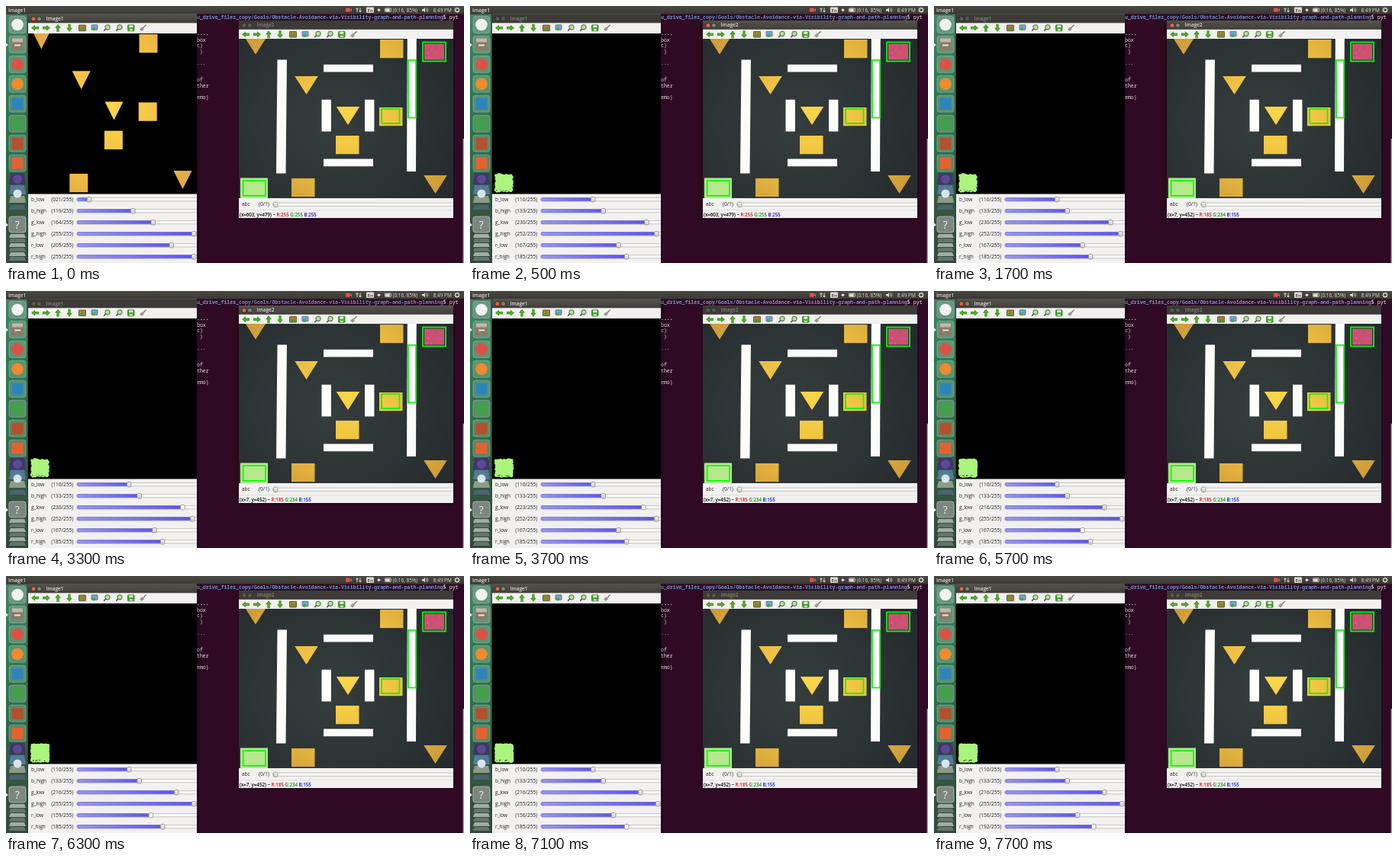
These frames come from a looping animation (600 px wide and 337 px high, 8000 ms). An HTML page with a canvas:

```html
<!DOCTYPE html>
<html lang="en">
<head>
<meta charset="utf-8">
<title>Colour threshold sliders</title>
<style>
html, body { margin: 0; width: 100%; height: 100%; overflow: hidden; background: #300a24; }
canvas { display: block; width: 100vw; height: 100vh; }
</style>
</head>
<body>
<canvas id="stage" width="600" height="337"></canvas>
<script>
const c = document.getElementById('stage').getContext('2d');
const LOOP = 8000, STEP = 200;
const SANS = '"Open Sans", sans-serif';
const MONO = '"Noto Sans Mono", monospace';
const INK = '#222', LIGHT = '#dfdbd2', GREEN = '#10f510', PANEL = '#f2f1f0';

const clamp = p => Math.min(1, Math.max(0, p));
const mix = (a, b, p) => Math.round(a + (b - a) * p);

function rect(x, y, w, h, fill) {
  c.fillStyle = fill;
  c.fillRect(x, y, w, h);
}
function outline(x, y, w, h, color, width = 1.8) {
  c.strokeStyle = color;
  c.lineWidth = width;
  c.strokeRect(x, y, w, h);
}
function poly(fill, ...points) {
  c.beginPath();
  points.forEach(p => c.lineTo(...p));
  c.fillStyle = fill;
  c.fill();
}
function line(color, width, ...points) {
  c.beginPath();
  points.forEach(p => c.lineTo(...p));
  c.strokeStyle = color;
  c.lineWidth = width;
  c.stroke();
}
function disc(x, y, r, fill) {
  c.beginPath();
  c.arc(x, y, r, 0, 7);
  c.fillStyle = fill;
  c.fill();
}
function round(x, y, w, h, r, fill, edge) {
  c.beginPath();
  c.roundRect(x, y, w, h, r);
  c.fillStyle = fill;
  c.fill();
  if (!edge) return;
  c.strokeStyle = edge;
  c.lineWidth = 0.8;
  c.stroke();
}
function stops(gradient, colors) {
  colors.forEach((col, i) => gradient.addColorStop(i / (colors.length - 1), col));
  return gradient;
}
const fadeDown = (y0, y1, ...colors) => stops(c.createLinearGradient(0, y0, 0, y1), colors);
const fadeRight = (x0, x1, ...colors) => stops(c.createLinearGradient(x0, 0, x1, 0), colors);
const glow = (x, y, r, ...colors) => stops(c.createRadialGradient(x, y, 0, x, y, r), colors);

// Draws text and returns the x where it ends
function text(s, x, y, color, size = 6.5, weight = 400, family = SANS) {
  c.font = `${weight} ${size}px ${family}`;
  c.fillStyle = color;
  c.fillText(s, x, y);
  return x + c.measureText(s).width;
}
function random(seed) {
  return () => (seed = (seed * 16807) % 2147483647) / 2147483647;
}
// Draws inside a clipped box, with its corner as origin
function inside(x, y, w, h, paint, sx = 1, sy = 1) {
  c.save();
  c.beginPath();
  c.rect(x, y, w, h);
  c.clip();
  c.translate(x, y);
  c.scale(sx, sy);
  paint();
  c.restore();
}

// Slider values for the first colour, then for the second; "drag" moves them on
const SLIDERS = [
  { name: 'b_low', first: 21, second: 110 },
  { name: 'b_high', first: 119, second: 133 },
  { name: 'g_low', first: 164, second: 230, drag: { to: 216, near: 3300, down: 3500, up: 3900, leave: 3900, ease: 1 } },
  { name: 'g_high', first: 255, second: 252, drag: { to: 255, near: 4300, down: 4500, up: 4900, leave: 5300, ease: 1 } },
  { name: 'r_low', first: 205, second: 167, drag: { to: 156, near: 5700, down: 5900, up: 6700, leave: 6900, ease: 2 } },
  { name: 'r_high', first: 255, second: 185, drag: { to: 192, near: 7100, down: 7100, up: 7500, leave: LOOP, ease: 1 } }
];

function sliderValue({ first, second, drag }, t) {
  if (t < 500) return first;
  if (!drag) return second;
  const p = clamp((t - drag.down) / (drag.up - drag.down));
  return mix(second, drag.to, 1 - (1 - p) ** drag.ease);
}

function terminal() {
  rect(0, 0, 600, 337, '#300a24');
  const print = (s, x, row, color, weight) => text(s, x, 16.8 + row * 7.5, color, 6.57, weight, MONO);
  const end = print('u_drive_files_copy/Goals/Obstacle-Avoidance-via-Visibility-graph-and-path-planning', 250, 0, '#7195cc', 700);
  print('$ pyt', end, 0, '#f0ecee');
  '||||----|box|c)| )||...|||of|ther||emo)'.split('|').forEach((s, row) => print(s, 250, row - 1, '#e6e0e4'));
  rect(598.6, 174, 1.4, 163, '#aaa5a5');
}

function topPanel() {
  rect(0, 0, 600, 10.5, fadeDown(0, 10.5, '#4a4944', '#3a3935'));
  text('Image1', 3, 7.8, LIGHT, 6.5, 600);
  round(445, 2.8, 5.5, 5, 1, '#e0574c');
  poly('#e0574c', [450, 5.3], [453, 3], [453, 7.6]);
  for (const [x, dir] of [[460, -1], [464, 1]]) {
    line(LIGHT, 1, [x, 5.3 - dir * 2.7], [x, 5.3 + dir * 2]);
    poly(LIGHT, [x - 2, 5.3 + dir], [x + 2, 5.3 + dir], [x, 5.3 + dir * 3.3]);
  }
  round(472, 1.6, 10, 7.4, 1, LIGHT);
  text('En', 473.6, 7.6, '#3a3935', 6, 600);
  disc(488.5, 5.3, 1.8, LIGHT);
  round(496.5, 3, 8, 4.6, 0.8, '#55534e', LIGHT);
  rect(497.2, 3.6, 5.6, 3.4, LIGHT);
  text('(0:16, 85%)', 506.5, 7.8, LIGHT);
  poly(LIGHT, [545, 4], [547, 4], [549, 2], [549, 8.6], [547, 6.6], [545, 6.6]);
  for (const r of [2, 3.8]) {
    c.beginPath();
    c.arc(549, 5.3, r, -0.9, 0.9);
    c.strokeStyle = LIGHT;
    c.lineWidth = 0.8;
    c.stroke();
  }
  text('8:49 PM', 559.5, 7.8, LIGHT);
  gear(591, 5.3, 2.3);
}

function gear(x, y, r) {
  for (let i = 0; i < 8; i++) {
    const dx = Math.cos(i * Math.PI / 4), dy = Math.sin(i * Math.PI / 4);
    line(LIGHT, 1.1, [x + dx * r, y + dy * r], [x + dx * (r + 1.4), y + dy * (r + 1.4)]);
  }
  c.beginPath();
  c.arc(x, y, r, 0, 7);
  c.strokeStyle = LIGHT;
  c.lineWidth = 1.2;
  c.stroke();
}

const APPS = ['#f0f3f0 disc', '#8a7a68 drawer', '#dd5144 disc', '#f08a2c disc',
  '#2f83bd square', '#43a047 square', '#b64f2c square', '#e2622f square'];

function launcher() {
  rect(0, 10.5, 29, 326.5, fadeDown(10, 337, '#4a7f66', '#2f7a53', '#2c7049', '#33593f', '#35483e'));
  rect(27.8, 10.5, 1.2, 326.5, '#2b4438');
  APPS.forEach((app, i) => {
    const [color, shape] = app.split(' '), y = 24.5 + i * 25.95;
    round(4, y - 11, 22, 22, 3, 'rgba(200,215,205,.28)', 'rgba(220,235,225,.35)');
    if (shape === 'disc') disc(15, y, 7.8, color);
    else rect(7.5, y - 7.5, 15, 15, color);
    if (shape === 'drawer') {
      rect(8, y - 8, 14, 5, '#c4b7a6');
      rect(11, y, 8, 2, '#eee6da');
    }
  });
  // Icons folded together at the lower end
  const fold = (y, h, fill) => poly(fill, [6, y], [24, y], [26, y + h], [4, y + h]);
  ['#40356c', '#55799a', '#8f9b8a', '#4d6173'].forEach((col, i) => fold(219 + 17 * i - i * i, 15 - 3 * i, col));
  disc(15, 227, 6, '#5a4a92');
  disc(15, 246, 5.5, '#d9e4ee');
  round(4, 276, 22, 21, 3, '#7c8782', '#b5beb9');
  text('?', 11.8, 291.5, '#eef1ef', 14);
  for (let i = 0; i < 6; i++) fold(299 + i * 6, 5, i % 2 ? '#62766b' : '#a2aca6');
  for (const y of [51, 287]) poly('#e6eae7', [0, y - 2.5], [3, y], [0, y + 2.5]);
}

function frame(title, x, y, w, h, active) {
  c.save();
  c.shadowColor = 'rgba(0,0,0,.5)';
  c.shadowBlur = active ? 7 : 3;
  rect(x, y, w, h, PANEL);
  c.restore();
  rect(x, y, w, 11.8, active ? fadeDown(y, y + 12, '#55534d', '#3f3e39') : '#3c3b37');
  [active ? '#ec6239' : '#5c5a54', active ? '#85827a' : '#5c5a54'].forEach((fill, i) => {
    disc(x + 7 + i * 7.5, y + 6.2, 3.1, '#2f2e2a');
    disc(x + 7 + i * 7.5, y + 6.2, 2.5, fill);
  });
  text(title, x + 23.5, y + 8.4, active ? LIGHT : '#85827b', 6.5, 600);
  toolbar(x, y + 18.3);
}

function toolbar(x, y) {
  c.save();
  c.translate(x, y);
  [0, 2, 1, 3].forEach((turn, i) => {
    c.save();
    c.translate(9 + i * 15, 0);
    c.rotate(turn * Math.PI / 2);
    poly('#3f9b1c', [-5, 0], [0, -4], [0, -1.7], [5, -1.7], [5, 1.7], [0, 1.7], [0, 4]);
    line('#6cc03f', 0.8, [-3, 0], [4, 0]);
    c.restore();
  });
  round(66.5, -3.8, 9, 7.6, 0.6, '#a8812c', '#4c452c');
  rect(68, 0, 6, 2.5, '#4f9a35');
  round(83, -4, 8, 6.5, 0.6, '#6fa6d8', '#4f6a78');
  disc(86, 1.5, 2.2, '#55a83a');
  for (const lx of [103, 119]) {
    line('#55524d', 1.6, [lx - 3.8, 3.8], [lx, 0]);
    disc(lx + 1, -1, 3.6, '#4d7a40');
    disc(lx + 1, -1, 2.5, '#b4e39c');
  }
  round(130.5, -4, 8.5, 8, 1, '#3fa528', '#2f7a20');
  rect(132.3, -3.6, 5, 3, '#e3f3dd');
  rect(132.8, 1.4, 4, 2.4, '#c4e2ba');
  line('#77736d', 1.3, [154.5, -4], [150.5, 0]);
  poly('#9b9790', [149, -1.5], [152, 1.5], [149, 4.2], [146, 2]);
  c.restore();
}

function track(x0, x1, y, knob, hot) {
  round(x0, y - 2.1, x1 - x0, 4.2, 2, '#fbfbfb', '#bbb8b4');
  if (knob > x0 + 4) round(x0, y - 2.1, knob - x0, 4.2, 2, fadeRight(x0, knob, '#9a96ee', '#5c52f2'), '#7671cc');
  round(knob - 2.7, y - 3.1, 5.6, 6.3, 1.4, hot ? '#fff' : fadeDown(y - 3, y + 3, '#f4f3f2', '#d2d0cc'), '#8b8885');
}

// Scene seen by the camera, 281 by 209; both windows show its yellow pieces
const SQUARES = [[185, 1], [184, 90], [127, 127], [69, 183]];
const TRIANGLES = [[22, -3.5], [88.5, 49], [143, 89], [257.5, 179]];

function yellowPieces(...colors) {
  const fill = glow(143, 95, 170, ...colors);
  SQUARES.forEach(([x, y]) => rect(x, y, 30.5, 24.2, fill));
  TRIANGLES.forEach(([x, y]) => poly(fill, [x - 15.3, y], [x + 15.3, y], [x, y + 24]));
}

function bar(x, y, w, h, lean = 0) {
  poly('#fcfcfb', [x + lean, y], [x + w + lean, y], [x + w, y + h], [x, y + h]);
}

function board() {
  rect(0, 0, 281, 209, glow(120, 110, 200, '#353d3d', '#2d3435', '#24292b'));
  yellowPieces('#fbd747', '#eabb40', '#c8963a');
  for (const y of [33.7, 157.5]) bar(111, y, 65, 9.8);
  for (const x of [108.5, 165]) bar(x, 79.8, 12.4, 41.7);
  bar(49, 27.5, 12.5, 149, 1.5);
  bar(220, 0, 12, 174, 0.8);
  outline(222, 28, 10, 75.5, GREEN);

  rect(239.5, 3.5, 32.5, 26.5, '#1d3a2c');
  rect(243, 6.5, 26, 21, '#cb5273');
  const rnd = random(77);
  for (let i = 0; i < 26; i++) rect(244 + rnd() * 23, 7 + rnd() * 19, 1.2, 0.9, i % 2 ? '#a93f5a' : '#dd6c85');
  outline(241, 4.5, 30, 25, GREEN);

  rect(2, 182.5, 36, 27, '#b4e98c');
  outline(5.6, 186, 29.4, 19.8, GREEN);
  outline(187, 92, 23.5, 19, GREEN);
}

// Green square left by the thresholds; wider ranges give smoother edges
function patch(loose) {
  const rnd = random(7919 + loose * 131);
  const size = 25.6, x = 31.8, y = 219.3, n = 14;
  const rough = 2 - loose * 0.035;
  c.save();
  c.translate(x + size / 2, y + size / 2);
  const points = [];
  for (let i = 0; i < 4 * n; i++) {
    const a = i / (4 * n) * 2 * Math.PI;
    const edge = size / 2 / Math.max(Math.abs(Math.cos(a)), Math.abs(Math.sin(a)));
    const r = Math.min(edge, size * 0.66) - rnd() * rough;
    points.push([Math.cos(a) * r, Math.sin(a) * r]);
  }
  poly('#aaf57c', ...points);
  for (let i = 0; i < 6; i++) rect(-11 + rnd() * 17, 8.5 + rnd() * 2, 0.6 + rnd() * 1.6, 0.8, '#12200c');
  c.restore();
}

function maskWindow(t, active) {
  frame('Image1', 29, 10.5, 221, 326.5, active);
  const values = SLIDERS.map(s => sliderValue(s, t));
  rect(29, 36, 221, 210.5, '#000');
  if (t < 500) inside(29, 36, 221, 210, () => yellowPieces('#ffd24a', '#f3c045', '#dca545'), 221 / 281, 1.005);
  else {
    const [, , gLow, gHigh, rLow, rHigh] = values;
    patch(230 - gLow + gHigh - 252 + 167 - rLow + rHigh - 185);
  }
  inside(29, 246.5, 221, 90.5, () => SLIDERS.forEach(({ name, drag }, i) => {
    const y = 7.2 + i * 15, v = values[i];
    text(name, 4, y + 2.4, INK);
    text(`(${String(v).padStart(3, '0')}/255)`, 30.3, y + 2.4, INK, 6.6);
    track(64, 227, y, 67.6 + v * 0.586, drag && t >= drag.near && t < drag.leave);
  }));
}

function boardWindow(t, active) {
  frame('Image2', 305, 19, 281, 259, active);
  inside(305, 43, 281, 209, board);
  inside(305, 252, 281, 26, () => {
    text('abc', 4, 10.4, INK);
    text('(0/1)', 26, 10.4, INK, 6.6);
    track(44.5, 285, 8.3, 48, false);
    line('#dad8d5', 0.7, [0, 15.8], [281, 15.8]);
    const p = clamp((t - 1300) / 400);
    const put = (s, x, color) => text(s, x, 23.7, color, 6.15, 600);
    let x = put(`(x=${mix(603, 7, p)}, y=${mix(479, 452, p)}) ~ `, 1, '#000');
    x = put(`R:${mix(255, 185, p)} `, x, '#d01010');
    x = put(`G:${mix(255, 234, p)} `, x, '#108a10');
    put(`B:${mix(255, 155, p)}`, x, '#1010d0');
  });
}

function draw(t) {
  const rightActive = t >= 500 && t < 3700;
  terminal();
  maskWindow(t, !rightActive);
  boardWindow(t, rightActive);
  launcher();
  topPanel();
}

function tick() {
  const t = performance.now() % LOOP;
  draw(Math.max(0, Math.floor((t - 100) / STEP) * STEP + 100));
  requestAnimationFrame(tick);
}
tick();
</script>
</body>
</html>
```
